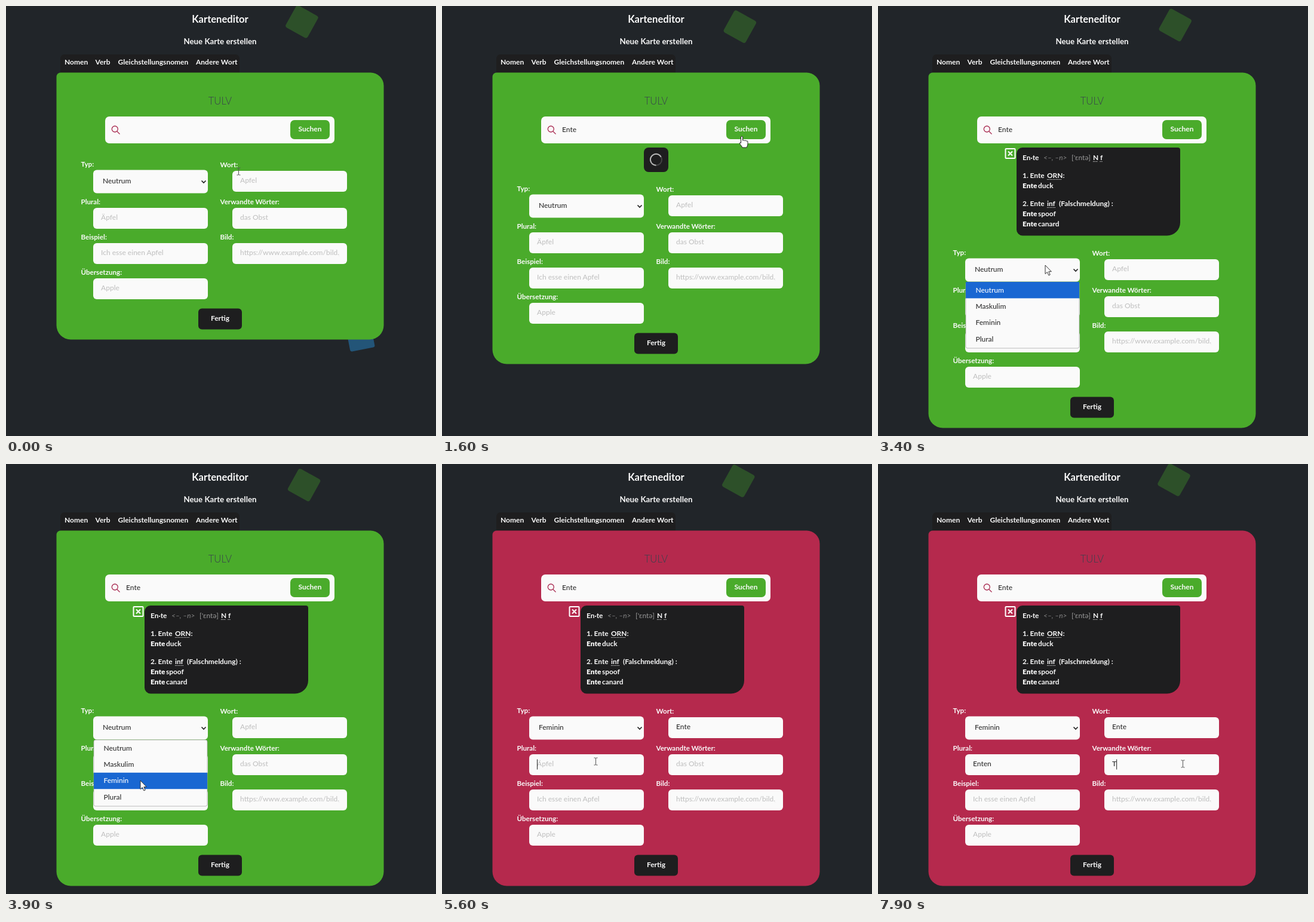
Write an HTML page that moves like this. It is 720x720 px and loops after 8000 ms.

```html
<!DOCTYPE html>
<html lang="de">
<head>
<meta charset="utf-8">
<title>Karteneditor</title>
<style>
html, body { margin: 0; width: 100%; height: 100%; overflow: hidden; background: #212529; }
svg { display: block; width: 100vw; height: 100vh; }
text { font-family: Lato, "Noto Sans", sans-serif; font-size: 12px; white-space: pre; }
.b { font-weight: 700; fill: #fafafa; }
.label { font-size: 11.6px; }
.dict { font-size: 11.9px; }
.strong { font-weight: 900; }
.value { fill: #303030; font-weight: 500; }
.empty { fill: #c3c3c3; }
.mid { text-anchor: middle; }
</style>
</head>
<body>
<svg id="stage" viewBox="0 0 720 720"></svg>
<script>
const LOOP = 8000;
const GREEN = '#4aab2b', RED = '#b5294d', DARK = '#1e1e1f', WHITE = '#fafafa';
const stage = document.getElementById('stage');
const $ = id => document.getElementById(id);

const rect = (x, y, w, h, r, fill, more = '') =>
  `<rect x="${x}" y="${y}" width="${w}" height="${h}" rx="${r}" fill="${fill}" ${more}/>`;
const text = (x, y, s, cls = 'b', more = '') =>
  `<text x="${x}" y="${y}" class="${cls}" ${more}>${s}</text>`;
const panel = (x, y, w, h, tl, tr, br, bl) =>
  `M${x + tl} ${y}h${w - tl - tr}q${tr} 0 ${tr} ${tr}v${h - tr - br}q0 ${br} ${-br} ${br}` +
  `h${br + bl - w}q${-bl} 0 ${-bl} ${-bl}v${bl + tl - h}q0 ${-tl} ${tl} ${-tl}z`;
const roundPanel = (x, y, w, h, tl, tr, br, bl) =>
  panel(x, y, w, h, tl, tr, br, bl).replace(/q(\S+) (\S+) (\S+) (\S+?)(?=[vhz])/g,
    (_, a, b, c, d) => `a${Math.abs(c)} ${Math.abs(c)} 0 0 1 ${c} ${d}`);

const fields = {
  word:    { x: 379, y: 276, label: 'Wort:', hint: 'Apfel' },
  plural:  { x: 146, y: 338, label: 'Plural:', hint: 'Äpfel' },
  related: { x: 379, y: 338, label: 'Verwandte Wörter:', hint: 'das Obst' },
  example: { x: 146, y: 397, label: 'Beispiel:', hint: 'Ich esse einen Apfel' },
  image:   { x: 379, y: 397, label: 'Bild:', hint: 'https://www.example.com/bild.jpg' },
  english: { x: 146, y: 456, label: 'Übersetzung:', hint: 'Apple' }
};
const fieldSvg = ([id, f]) =>
  text(f.x - 20.5, f.y - 6, f.label, 'b label') +
  rect(f.x, f.y, 192, 35, 6, WHITE) +
  `<clipPath id="clip-${id}"><rect x="${f.x + 12}" y="${f.y}" width="167" height="35"/></clipPath>` +
  `<g clip-path="url(#clip-${id})">${text(f.x + 13, f.y + 20, f.hint, 'value empty', `id="${id}"`)}</g>`;

const options = ['Neutrum', 'Maskulim', 'Feminin', 'Plural'];
const ROW = 27.4;
const dots = (x, y, w) => `<path d="M${x} ${y}h${w}" stroke="#ccc" stroke-dasharray="1.5 1"/>`;

stage.innerHTML =
  rect(0, 0, 720, 720, 0, '#212529') +
  rect(-21, -21, 42, 42, 4, '#2d5029', 'id="greenTile"') +
  rect(-21, -21, 42, 42, 3, '#235578', 'id="blueTile"') +
  text(358.5, 28, 'Karteneditor', 'b mid', 'style="font-size:16.6px"') +
  text(358.5, 63.5, 'Neue Karte erstellen', 'b mid', 'style="font-size:13.3px"') +
  `<path d="${roundPanel(91, 81, 300, 31, 7, 7, 1, 1)}" fill="${DARK}"/>` +
  [[98, 'Nomen'], [149.5, 'Verb'], [187.5, 'Gleichstellungsnomen'], [318, 'Andere Wort']]
    .map(([x, s]) => text(x, 98, s)).join('') +
  '<path id="card"/>' +
  text(358.5, 165, 'TULV', 'mid', 'style="font-size:16.6px;font-weight:300" fill="#39424d"') +
  rect(166, 185, 384, 45, 7, WHITE) +
  '<g fill="none" stroke="#a82a50" stroke-width="1.3"><circle cx="182.3" cy="206" r="5"/><path d="M186 210l4.5 4.5"/></g>' +
  text(201, 210.5, '', 'value', 'id="query"') +
  rect(476, 191, 66, 32, 7, GREEN) + text(509, 209.5, 'Suchen', 'b mid') +
  `<g id="loader">${rect(338, 237, 41, 41, 8, DARK)}
    <g fill="none" stroke-width="2"><circle cx="358.5" cy="257.3" r="9.5" stroke="#444"/>
    <path id="arc" d="M358.5 266.8a9.5 9.5 0 1 1 8.2 -14.2" stroke="#b9b9b9"/></g></g>` +
  `<g id="dictionary"><path d="${roundPanel(232, 237, 274, 147.5, 10, 4, 22, 10)}" fill="${DARK}"/>
    <g fill="none" stroke="#fff" stroke-width="2"><rect x="213.5" y="239" width="16" height="16" rx="1"/>
    <path d="M218 243.5l7 7m0-7l-7 7"/></g>` +
    text(242, 258, 'En·te', 'b dict') +
    text(277, 258, '&lt;–, –n&gt;', 'dict', 'fill="#858585" font-style="italic"') +
    text(324, 258, "['ɛntə]", 'dict', 'fill="#999"') +
    text(360, 258, 'N', 'b dict') + text(372, 258, 'f', 'b dict') +
    dots(360, 260.5, 8) + dots(371.5, 260.5, 5) +
    text(242, 288, '1. Ente', 'b dict') + text(283, 288, 'ORN:', 'b dict') + dots(283, 290.5, 24) +
    text(242, 335, '2. Ente', 'b dict') + text(283, 335, 'inf', 'b dict') + dots(283, 337.5, 15) +
    text(303, 335, '(Falschmeldung) :', 'b dict') +
    [[305, 'duck'], [352, 'spoof'], [368.5, 'canard']].map(([y, s]) =>
      text(242, y, 'Ente', 'b dict strong') + text(268, y, s, 'b dict')).join('') +
  '</g>' +
  `<g id="form">${text(125.5, 269, 'Typ:', 'b label')}${rect(146, 274.5, 192, 39, 6, WHITE)}
    ${text(162, 297, '', 'value', 'id="kind"')}
    <path d="M327.5 292.5l3.5 3.5 3.5-3.5" fill="none" stroke="#222" stroke-width="1.7"/>
    ${Object.entries(fields).map(fieldSvg).join('')}
    ${rect(322, 506.5, 73, 35, 6, DARK)}${text(358.5, 526.5, 'Fertig', 'b mid')}</g>` +
  `<g id="menu">${rect(147, 462, 190, 111, 3, WHITE, 'stroke="#aaa" stroke-width=".8"')}
    ${rect(147, 462, 190, ROW, 0, '#1967d2', 'id="active"')}
    ${options.map((s, i) => text(163.5, 479.5 + i * ROW, s, 'value', `id="option${i}"`)).join('')}</g>` +
  '<path id="caret" stroke="#222" stroke-width="1"/>' +
  `<path id="beam" d="M-3 -6h2.2l.8 1 .8-1h2.2M0 -5v10M-3 6h2.2l.8-1 .8 1h2.2" fill="none" stroke="#555"/>
   <path id="arrow" d="M0 0v14.5l3.4-3 2.5 5.5 2.3-1-2.4-5.3h4.5z" fill="#fff" stroke="#333"/>
   <path id="hand" d="M-1.5 1q1.5-2 3 0v6q2-1 3 .5 2-1 3 .5 2-.6 2.5 1v4q0 3-2 6h-7q-2-3.5-5-7 .5-2 2.5-.5z" fill="#fff" stroke="#222"/>`;

// Pointer hotspot: time, x, y
const pointer = [
  [0, 389.5, 277], [350, 300, 207], [850, 300, 207], [1250, 502, 216], [1600, 502, 218],
  [2600, 498, 218], [2750, 498, 218], [3150, 280, 434], [3500, 280, 434], [3800, 225, 530],
  [3950, 225, 530], [4500, 455.5, 453], [5150, 455.5, 453], [5500, 257.5, 498],
  [6800, 257.5, 498], [7300, 510.5, 502], [LOOP, 510.5, 502]
];
// Typed text: target, start, ms per letter, text
const typing = [
  ['query', 500, 100, 'Ente'], ['word', 4850, 90, 'Ente'],
  ['plural', 5950, 130, 'Enten'], ['related', 7800, 120, 'T']
];
// Focus: start, end, target
const focus = [[350, 1250, 'query'], [4650, 5480, 'word'], [5480, 7400, 'plural'], [7400, LOOP, 'related']];

function pointerAt(t) {
  const i = pointer.findIndex(p => p[0] > t);
  const [t0, x0, y0] = pointer[i - 1], [t1, x1, y1] = pointer[i];
  const k = (t - t0) / (t1 - t0), e = k * k * (3 - 2 * k);
  return [x0 + (x1 - x0) * e, y0 + (y1 - y0) * e];
}
const within = (x, y, bx, by, w, h) => x >= bx && x <= bx + w && y >= by && y <= by + h;
function pointerKind(x, y, shift, menuOpen) {
  if (within(x, y, 476, 191, 66, 32)) return 'hand';
  if (menuOpen) return 'arrow';
  const overField = Object.values(fields).some(f => within(x, y, f.x, f.y + shift, 192, 35));
  return overField || within(x, y, 166, 185, 310, 45) ? 'beam' : 'arrow';
}
const show = (id, on) => $(id).setAttribute('visibility', on ? 'visible' : 'hidden');
const set = (id, name, value) => $(id).setAttribute(name, value);

function draw(t) {
  const loading = t >= 1300 && t < 2700, found = t >= 2700;
  const shift = found ? 148 : loading ? 41 : 0;
  const menuOpen = t >= 3200 && t < 3950;
  const [px, py] = pointerAt(t);

  const sway = (1 - Math.cos((t - 140) / 2520 * 2 * Math.PI)) / 2;
  set('greenTile', 'transform', `translate(${495.3 + 3.8 * sway} ${26 + 9.2 * sway}) rotate(29)`);
  set('blueTile', 'transform', `translate(${593 + 9 * sway} ${554.5 - 4 * sway}) rotate(-11)`);

  set('card', 'd', roundPanel(84.5, 111.5, 548, 447 + shift, 7, 22, 24, 24));
  set('card', 'fill', t >= 3950 ? RED : GREEN);
  set('form', 'transform', `translate(0 ${shift})`);
  show('loader', loading);
  show('dictionary', found);
  set('arc', 'transform', `rotate(${(t - 1600) * .36} 358.5 257.3)`);

  $('kind').textContent = t >= 3950 ? 'Feminin' : 'Neutrum';
  show('menu', menuOpen);
  const row = Math.max(0, Math.min(3, Math.floor((py - 462) / ROW)));
  set('active', 'y', 462 + row * ROW);
  options.forEach((_, i) => { $('option' + i).style.fill = i === row ? '#fff' : ''; });

  for (const [id, start, step, word] of typing) {
    const typed = word.slice(0, Math.max(0, Math.floor((t - start) / step) + 1));
    $(id).textContent = typed || (fields[id] ? fields[id].hint : '');
    $(id).classList.toggle('empty', !typed);
  }

  const active = focus.find(([a, b]) => t >= a && t < b);
  show('caret', active && (t - active[0]) % 1000 < 530);
  if (active) {
    const el = $(active[2]), blank = el.classList.contains('empty');
    const x = +el.getAttribute('x') + (blank ? 0 : el.getComputedTextLength());
    const y = +el.getAttribute('y') + (active[2] === 'query' ? 0 : shift);
    set('caret', 'd', `M${x + .5} ${y - 11.5}v17`);
  }

  const kind = pointerKind(px, py, shift, menuOpen);
  for (const id of ['beam', 'arrow', 'hand']) {
    show(id, id === kind);
    set(id, 'transform', `translate(${px} ${py})`);
  }
}

const began = performance.now();
function tick() {
  draw((performance.now() - began) % LOOP);
  requestAnimationFrame(tick);
}
tick();
</script>
</body>
</html>
```
